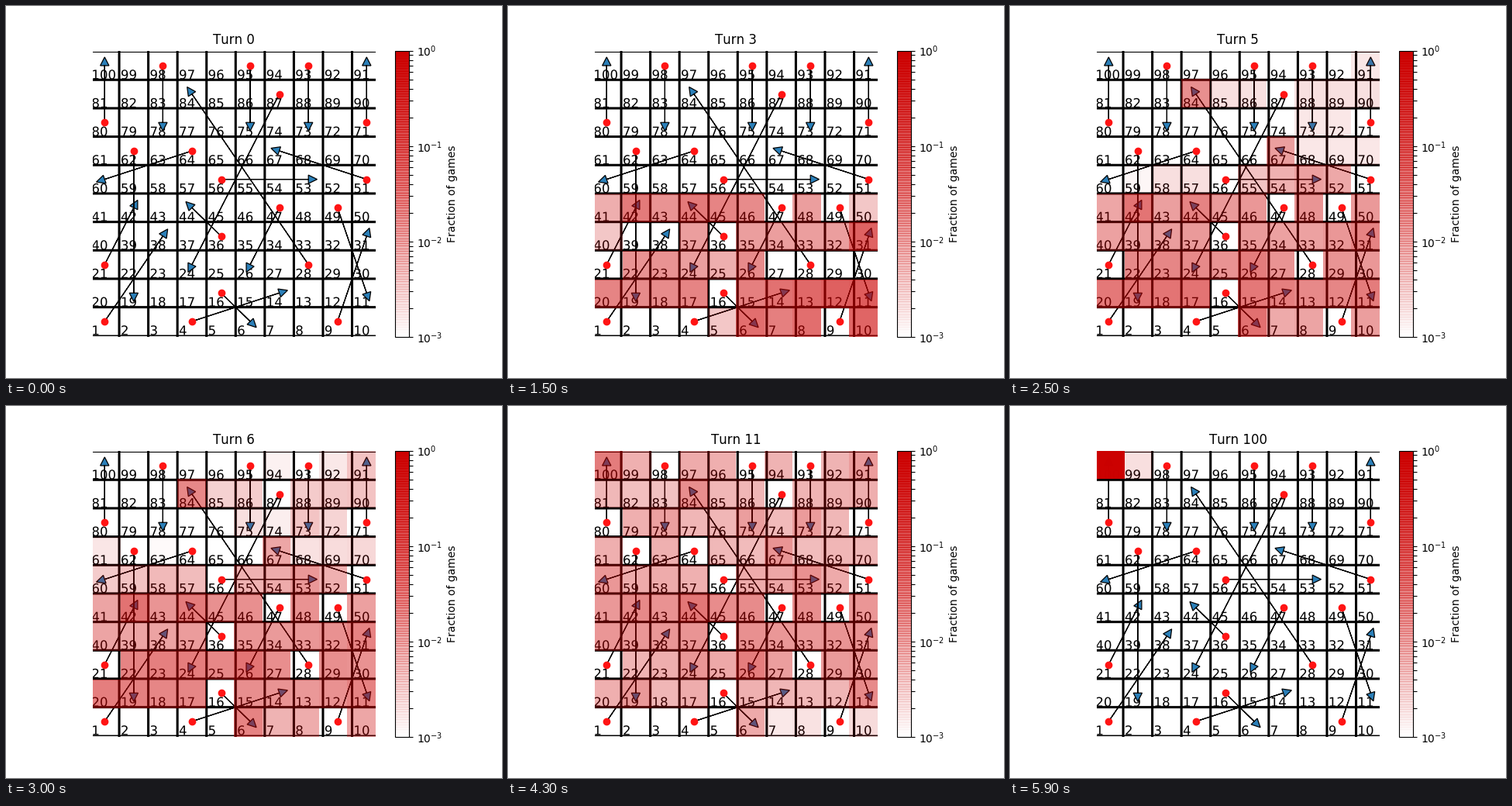
Animation of 640x480 px, one loop 6900 ms. Source, as a matplotlib script:

```python
import numpy as np
import matplotlib.pyplot as plt
from matplotlib.animation import FuncAnimation
from matplotlib.cm import ScalarMappable
from matplotlib.colors import LinearSegmentedColormap, LogNorm
from matplotlib.patches import FancyArrow, PathPatch
from matplotlib.textpath import TextPath
from matplotlib.transforms import Affine2D

plt.rcParams["font.family"] = "DejaVu Sans"
plt.rcParams["text.kerning_factor"] = 6

W, H, DPI = 640, 480, 100
JUMPS = {1: 38, 4: 14, 9: 31, 16: 6, 21: 42, 28: 84, 36: 44, 47: 26, 49: 11,
         51: 67, 56: 53, 62: 19, 64: 60, 71: 91, 80: 100, 87: 24, 93: 73,
         95: 75, 98: 78}

# Slow opening turns, then quick ones, then the final state.
TURNS = list(range(26)) + [50, 100]
SLOW, SLOW_TICKS, TICK, TICKS = 8, 5, 100, 69

# Board area in pixels, and the cell grid that overhangs it a little.
LEFT, RIGHT, TOP, BOTTOM = 112, 476.8, 57.6, 427.2
CELL_W, CELL_H = 37.56, 36.67
GRID_X, GRID_Y = 108.5, 425.3
NUMBER_SIZE = 16.6


def pixel_axes(left, top, right, bottom):
    return fig.add_axes([left / W, 1 - bottom / H,
                         (right - left) / W, (bottom - top) / H])


def cell(square):
    """Column and row of a square on the back-and-forth board."""
    row, col = divmod(square - 1, 10)
    return (col if row % 2 == 0 else 9 - col), row


def move_matrix():
    """Chance of each move; a roll past the last square is lost."""
    m = np.zeros((101, 101))
    for start in range(101):
        for roll in range(1, 7):
            end = start + roll
            end = start if end > 100 else JUMPS.get(end, end)
            m[start, end] += 1 / 6
    return m


def heat_grids():
    moves = move_matrix()
    chance = np.eye(101)[0]
    grids = {}
    for turn in range(TURNS[-1] + 1):
        grid = np.zeros((10, 10))
        for square in range(1, 101):
            col, row = cell(square)
            grid[row, col] = chance[square]
        grids[turn] = np.clip(grid, 1e-3, 1)
        chance = chance @ moves
    return grids


def draw_number(square):
    """Number as an outline, so it sits between whole pixels."""
    col, row = cell(square)
    x = GRID_X + (col + 0.05) * CELL_W
    y = H - GRID_Y + (row + 0.022) * CELL_H
    path = TextPath((x, y), str(square), size=NUMBER_SIZE)
    to_figure = Affine2D().scale(1 / DPI) + fig.dpi_scale_trans
    ax.add_patch(PathPatch(path, fc="k", lw=0, transform=to_figure, zorder=3))


def draw_board():
    for k in range(1, 10):
        ax.axvline(k, color="k", lw=2.2, snap=False)
        ax.axhline(k, color="k", lw=2.2, snap=False)
    ax.axhline(0, color="k", lw=1.1, snap=False)
    ax.axhline((GRID_Y - TOP - 0.9) / CELL_H, color="k", lw=0.8)

    for square in range(1, 101):
        draw_number(square)

    for start, end in JUMPS.items():
        (x0, y0), (x1, y1) = cell(start), cell(end)
        ax.add_patch(FancyArrow(x0 + 0.5, y0 + 0.5, x1 - x0, y1 - y0,
                                width=0.001, head_width=0.3, head_length=0.3,
                                fc="#2b7fb8", ec="k", lw=0.9, snap=False,
                                zorder=3))
        ax.plot(x0 + 0.5, y0 + 0.5, "o", color="#ff1414", ms=6, snap=False,
                zorder=4)


def draw_colorbar():
    bar_ax = pixel_axes(501.6, TOP, 520.1, BOTTOM)
    fig.colorbar(ScalarMappable(norm, cmap), cax=bar_ax,
                 label="Fraction of games")
    bar_ax.tick_params(which="minor", length=3.5, width=0.8)
    # Fine stripes where neighbouring translucent steps overlap.
    values = np.logspace(-3, 0, 114)[1:-1]
    bar_ax.hlines(values, 0, 1, colors=cmap(norm(values)), lw=0.72,
                  antialiased=False)


fig = plt.figure(figsize=(W / DPI, H / DPI), dpi=DPI, facecolor="white")
ax = pixel_axes(LEFT, TOP, RIGHT, BOTTOM)
ax.axis("off")
draw_board()

xlim = (LEFT - GRID_X) / CELL_W, (RIGHT - GRID_X) / CELL_W
ylim = (GRID_Y - BOTTOM) / CELL_H, (GRID_Y - TOP) / CELL_H
cmap = LinearSegmentedColormap.from_list("heat", [(0.8, 0, 0, 0), (0.8, 0, 0, 1)])
norm = LogNorm(1e-3, 1)
grids = heat_grids()
heat = ax.imshow(grids[0], cmap=cmap, norm=norm, origin="lower", aspect="auto",
                 extent=(*xlim, *ylim), interpolation="nearest", zorder=10)
ax.set(xlim=xlim, ylim=ylim)
title = ax.set_title("Turn 0")
draw_colorbar()


def update(tick):
    slow_end = SLOW * SLOW_TICKS
    step = tick // SLOW_TICKS if tick < slow_end else SLOW + tick - slow_end
    turn = TURNS[min(step, len(TURNS) - 1)]
    heat.set_data(grids[turn])
    title.set_text(f"Turn {turn}")
    return heat, title


anim = FuncAnimation(fig, update, frames=TICKS, interval=TICK, repeat=True,
                     repeat_delay=0, blit=False)
plt.show()
```
